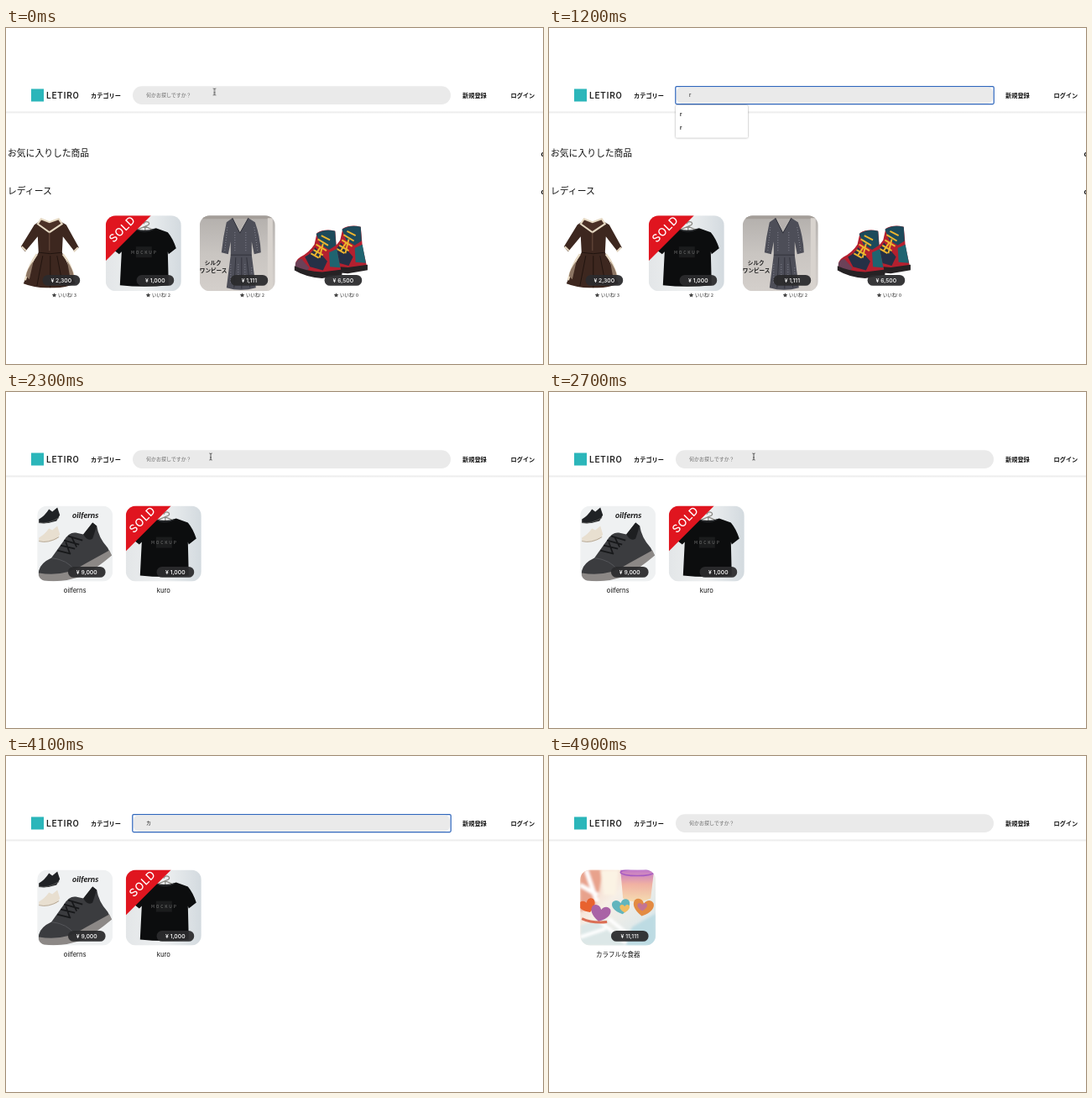
These frames come from a looping animation (640 px wide and 400 px high, 5 s). An HTML page:

```html
<!DOCTYPE html>
<html lang="ja">
<head>
<meta charset="utf-8">
<title>Flea market search</title>
<style>
html, body { margin: 0; width: 100%; height: 100%; overflow: hidden; background: #fff; }
svg { display: block; width: 640px; height: 400px; font-family: "Noto Sans CJK JP", "Noto Sans CJK", sans-serif; fill: #111; }
.nav { font-size: 7.2px; font-weight: 700; }
.head { font-size: 10.8px; font-weight: 500; }
.like { font-size: 5.3px; font-weight: 500; fill: #222; }
.price { font: 500 6.8px Inter, sans-serif; fill: #fff; text-anchor: middle; }
.name { font-size: 7.5px; font-weight: 500; text-anchor: middle; }
.latin { font: 400 7.6px Inter, sans-serif; }
.field { font-size: 6px; font-weight: 500; }
.item { font-size: 5.5px; font-weight: 700; }
.sold { font: 500 13.2px Inter, sans-serif; fill: #fff; letter-spacing: .6px; text-anchor: middle; }
.ring, .menu { fill: #fff; }
.menu { filter: drop-shadow(0 .6px .9px rgba(0, 0, 0, .4)); }

.t { animation: 5s step-end infinite; opacity: 0; }
#home { animation-name: home; }
#found { animation-name: found; }
#last { animation-name: last; }
#ring { animation-name: ring; }
#pill { animation-name: pill; }
#hint { animation-name: hint; }
#typeR, #short { animation-name: typeR; }
#typeKa { animation-name: typeKa; }
#caret { animation-name: caret; }
#list { animation-name: list; }
#beam { animation-name: beam; }
#path { animation: path 5s linear infinite; }

@keyframes home { 0% { opacity: 1 } 42%, 100% { opacity: 0 } }
@keyframes found { 0% { opacity: 0 } 42% { opacity: 1 } 96%, 100% { opacity: 0 } }
@keyframes last { 0% { opacity: 0 } 96%, 100% { opacity: 1 } }
@keyframes ring { 0% { opacity: 0 } 6% { opacity: 1 } 42% { opacity: 0 } 58% { opacity: 1 } 96%, 100% { opacity: 0 } }
@keyframes pill { 0% { opacity: 1 } 6% { opacity: 0 } 42% { opacity: 1 } 58% { opacity: 0 } 96%, 100% { opacity: 1 } }
@keyframes hint { 0% { opacity: 1 } 18% { opacity: 0 } 42% { opacity: 1 } 82% { opacity: 0 } 96%, 100% { opacity: 1 } }
@keyframes typeR { 0% { opacity: 0 } 18% { opacity: 1 } 42%, 100% { opacity: 0 } }
@keyframes typeKa { 0% { opacity: 0 } 82% { opacity: 1 } 96%, 100% { opacity: 0 } }
@keyframes caret { 0% { opacity: 0 } 6% { opacity: 1 } 12% { opacity: 0 } 58% { opacity: 1 } 64% { opacity: 0 } 70% { opacity: 1 } 76%, 100% { opacity: 0 } }
@keyframes list { 0% { opacity: 0 } 6% { opacity: 1 } 18% { opacity: 0 } 58% { opacity: 1 } 82%, 100% { opacity: 0 } }
@keyframes beam { 0% { opacity: 1 } 18% { opacity: 0 } 46% { opacity: 1 } 82%, 100% { opacity: 0 } }
@keyframes path {
  0%, 18% { transform: translate(248.5px, 76px) }
  46%, 54% { transform: translate(244px, 77px) }
  60%, 100% { transform: translate(232px, 73px) }
}
</style>
</head>
<body>
<svg viewBox="0 0 640 400">
  <defs>
    <clipPath id="round"><rect width="90" height="90" rx="12"/></clipPath>
    <filter id="soft" x="-10%" y="-10%" width="120%" height="120%"><feGaussianBlur stdDeviation=".45"/></filter>
    <filter id="haze" x="-30%" y="-30%" width="160%" height="160%"><feGaussianBlur stdDeviation="1.8"/></filter>
    <linearGradient id="wall"><stop stop-color="#e3e6e8"/><stop offset=".5" stop-color="#eef0f1"/><stop offset="1" stop-color="#d3dadf"/></linearGradient>
    <linearGradient id="cloth" x2="0" y2="1"><stop stop-color="#b3afac"/><stop offset=".5" stop-color="#c9c5c1"/><stop offset="1" stop-color="#d4cfcb"/></linearGradient>
    <linearGradient id="table" x2="1" y2="1"><stop stop-color="#f3c8b4"/><stop offset=".4" stop-color="#f7efe6"/><stop offset="1" stop-color="#cfe4ec"/></linearGradient>
    <linearGradient id="glass" x2="0" y2="1"><stop stop-color="#b55bc4"/><stop offset=".45" stop-color="#f0a291"/><stop offset="1" stop-color="#f8d9a4"/></linearGradient>
    <linearGradient id="edge" x2="0" y2="1"><stop stop-color="#e4e4e4"/><stop offset="1" stop-color="#fff"/></linearGradient>

    <g id="dress">
      <rect width="90" height="90" fill="#fff"/>
      <g filter="url(#soft)">
        <path d="M33 7 27 11 11 37 16 43 31 25 32 44Q22 60 14 81 29 87 46 86 63 87 76 81 69 60 60 44L61 25 75 43 80 38 65 11 58 7Z" fill="#3d271f"/>
        <path d="M30 46Q21 58 16 77M61 46Q71 58 75 77" stroke="#e6d9c3" stroke-width="2.4" fill="none"/>
        <path d="M26 54Q18 64 17 72L21 76ZM66 54Q73 64 74 72L70 76Z" fill="#8d7664"/>
        <path d="M12 37l5 5M79 38l-5 5" stroke="#e6d9c3" stroke-width="2"/>
        <path d="M35 4 31 10 45 20 60 10 56 4 45 8Z" fill="#4b3026" stroke="#e6d9c3" stroke-width="2"/>
        <path d="M32 44Q46 47 60 44M37 48 30 84M46 48V86M54 48 61 84" stroke="#21140f" fill="none"/>
        <path d="M45 20V42" stroke="#785848" stroke-width=".8"/>
      </g>
    </g>

    <g id="tee">
      <rect width="90" height="90" fill="url(#wall)"/>
      <g filter="url(#soft)">
        <path d="M47 18V13Q54 11 51 8 47 6 45 10M35 18 47 13 58 18" stroke="#8c8a85" stroke-width="1.3" fill="none"/>
        <path d="M34 15Q46 20 60 15L74 20Q80 27 84 39L75 46 74 43 75 83Q46 86 17 83L19 43 16 46 7 39Q12 26 21 20Z" fill="#0c0d0e"/>
        <path d="M36 16Q46 22 58 16" stroke="#33363a" fill="none"/>
        <rect x="36" y="37" width="19" height="13" fill="#1b1c1d"/>
      </g>
      <text x="46" y="45.5" font-size="5" letter-spacing="1.8" fill="#777" text-anchor="middle">MOCKUP</text>
      <path d="M0 0H54L0 54Z" fill="#e0151f"/>
      <text class="sold" transform="translate(19.6 16.2) rotate(-45)" y="4.8">SOLD</text>
    </g>

    <g id="silk">
      <rect width="90" height="90" fill="url(#cloth)"/>
      <path d="M0 0H90V4H0Z" fill="#a49e99"/>
      <path d="M84 3V90" stroke="#d8d3ce" stroke-width="6"/>
      <g filter="url(#soft)">
        <path d="M39 3 32 8Q28 25 26 44L34 46 37 31 37 47 32 86Q49 91 67 86L62 47 62 31 65 46 73 44Q72 24 66 8L58 3 48 20Z" fill="#4d4e58"/>
        <path d="M39 3 48 21 58 3M37 47H62M43 50 41 86M50 50V87M56 50 60 86" stroke="#32333c" fill="none"/>
        <path d="M33 14 30 42M42 20V44M55 20V44M65 14 69 42M37 58v24M46 58v24M54 58v24M62 62v18" stroke="#858691" stroke-dasharray="1 2"/>
        <path d="M42 4 48 17 55 4Z" fill="#b5b0ad"/>
      </g>
      <g font-size="6.6" font-weight="700" fill="#222"><text x="6" y="59">シルク</text><text x="0" y="67.5">ワンピース</text></g>
    </g>

    <g id="boot">
      <path d="M2 51Q1 43 8 39 18 34 24 25L27 12Q36 7 48 10L50 32 55 54 50 59 5 54Z" fill="#b4202f"/>
      <path d="M26 13Q36 7 48 10L49 26 41 31 31 25Z" fill="#1d4a5b"/>
      <path d="M13 39Q21 35 25 28L39 44 34 54 19 50Z" fill="#253046"/>
      <path d="M41 34 50 30 54 51 42 50Z" fill="#1f6470"/>
      <path d="M2 46Q4 42 9 41L18 51 15 56 2 52Z" fill="#6c4158"/>
      <path d="M1 49 1 54Q15 62 33 63L56 59V53L33 56Q14 55 1 49Z" fill="#262224"/>
      <path d="M20 35 29 40M23 31 34 37M26 25 38 32M28 19 40 26M32 15 42 20M30 40 34 24M24 38 31 28" stroke="#edb52f" stroke-width="1.9" fill="none"/>
    </g>
    <g id="boots">
      <rect width="90" height="90" fill="#fff"/>
      <g filter="url(#soft)">
        <use href="#boot" transform="translate(31 3) scale(1.02 1.05)"/>
        <use href="#boot" transform="translate(0 8) scale(1.03 1.06)"/>
      </g>
    </g>

    <g id="wool">
      <rect width="90" height="90" fill="#eff1f2"/>
      <g filter="url(#soft)">
        <path d="M2 16Q9 12 14 4L18 7 24 2 27 11 23 18Q11 22 2 20Z" fill="#202225"/>
        <path d="M2 20Q13 22 26 14" stroke="#555" fill="none"/>
        <path d="M2 38Q9 34 14 27L18 29 24 24 27 34 23 40Q11 45 2 42Z" fill="#e8dfd0"/>
        <path d="M2 42Q13 45 26 37" stroke="#b7aa98" fill="none"/>
        <path d="M2 77Q4 68 17 62L32 41Q38 31 46 32L55 34 66 20 71 24Q73 38 84 50L88 58 70 72Q47 89 12 88 0 87 2 77Z" fill="#3b3c3f"/>
        <path d="M2 80Q34 85 57 69L86 53 89 59Q70 75 55 83 31 92 8 89 1 87 2 80Z" fill="#8c8886"/>
        <path d="M55 34 66 20 71 24 66 39Q60 43 55 34Z" fill="#1e1f21"/>
        <path d="M24 53 40 57M28 47 45 51M32 41 50 46M37 36 54 41M39 57 34 43M47 49 41 37" stroke="#17181a" stroke-width="1.7" fill="none"/>
        <path d="M17 62Q36 64 45 77" stroke="#55565a" fill="none"/>
      </g>
      <text x="57.5" y="14.5" text-anchor="middle" font-family="Lato, sans-serif" font-size="10" font-weight="700" font-style="italic">oilferns</text>
    </g>

    <path id="heart" d="M0 8C-9 3-11-2-9-6-6-9-2-8 0-4 2-8 6-9 9-6 11-2 9 3 0 8Z"/>
    <g id="bowls">
      <rect width="90" height="90" fill="url(#table)"/>
      <g filter="url(#haze)">
        <path d="M0 0H27L20 40 0 50Z" fill="#e8a28c"/>
        <path d="M7 0 20 38M0 18 21 30" stroke="#fff" stroke-width="5"/>
        <path d="M24 0H46L42 30H28Z" fill="#fbf3e4"/>
        <path d="M0 66 28 58 52 90H0Z" fill="#dce7e7"/>
        <path d="M22 60 56 88M34 58 66 84M0 80 30 70" stroke="#fff" stroke-width="4"/>
        <path d="M62 68 90 52V90H54Z" fill="#bddbe3"/>
      </g>
      <g filter="url(#soft)">
        <path d="M48 0H88L84 34Q67 42 51 34Z" fill="url(#glass)" opacity=".8"/>
        <ellipse cx="68" cy="3" rx="20" ry="4" fill="none" stroke="#a55ac2" stroke-width="1.5"/>
        <use href="#heart" transform="translate(9 43) rotate(-20)" fill="#e8622f"/>
        <use href="#heart" transform="translate(24 52) rotate(12) scale(1.2)" fill="#a963a6"/>
        <use href="#heart" transform="translate(49 44) rotate(-10) scale(1.1)" fill="#62b5bd"/>
        <use href="#heart" transform="translate(53 46) scale(.6)" fill="#f2bd62"/>
        <use href="#heart" transform="translate(75 45) rotate(10) scale(1.25)" fill="#e38b43"/>
        <use href="#heart" transform="translate(74 44) scale(.6)" fill="#c47493"/>
        <path d="M2 58Q15 64 32 62" stroke="#db6f55" stroke-width="3" fill="none"/>
      </g>
    </g>
  </defs>

  <rect width="640" height="400" fill="#fff"/>
  <rect y="99.6" width="640" height="2.6" fill="url(#edge)"/>
  <rect x="30" y="72.5" width="15" height="15" fill="#2bb6ba"/>
  <text x="48" y="84" font-family="Roboto, sans-serif" font-size="10.5" font-weight="500" letter-spacing=".8" fill="#222">LETIRO</text>
  <g class="nav">
    <text x="101" y="82.7">カテゴリー</text>
    <text x="544" y="82.7">新規登録</text>
    <text x="601.5" y="82.7">ログイン</text>
  </g>

  <g id="home" class="t">
    <g class="head">
      <text x="2" y="153.2">お気に入りした商品</text>
      <text x="2" y="198">レディース</text>
    </g>
    <g font-size="8" font-weight="700"><text x="637.6" y="153">c</text><text x="637.6" y="197.8">c</text></g>
  </g>
  <g id="found" class="t"></g>
  <g id="last" class="t"></g>

  <g id="ring" class="t">
    <rect class="ring" x="150.8" y="69.5" width="379.4" height="21.1" rx="1.5" stroke="#2f66bb" stroke-width="1.25"/>
    <rect x="152" y="70.6" width="377" height="18.9" rx="6" fill="#eaeaea"/>
  </g>
  <rect id="pill" class="t" x="151" y="69.3" width="379" height="21.6" rx="10.8" fill="#eaeaea"/>
  <g class="field">
    <text id="hint" class="t" x="167" y="82.2" fill="#6b6b6b">何かお探しですか？</text>
    <text id="typeR" class="t" x="167" y="82.2">r</text>
    <text id="typeKa" class="t" x="167" y="82.2">カ</text>
  </g>
  <rect id="caret" class="t" x="167" y="76.5" width=".7" height="7"/>
  <g id="list" class="t"></g>
  <g id="short" class="t"></g>
  <g id="path"><path id="beam" class="t" d="M-1.6-4Q0-4 0-3 0-4 1.6-4M0-3V3M-1.6 4Q0 4 0 3 0 4 1.6 4M-.8 1H.8" fill="none" stroke="#333" stroke-width=".8"/></g>
</svg>
<script>
const add = (id, html) => document.getElementById(id).insertAdjacentHTML('beforeend', html);

const card = (x, y, art, price, drop, foot) => `<g transform="translate(${x} ${y})">
  <use href="#${art}" clip-path="url(#round)"/>
  <rect x="36.8" y="${70.8 + drop}" width="44.6" height="12.8" rx="6.4" fill="#2b2b2d" opacity=".94"/>
  <text class="price" x="59" y="${79.7 + drop}">¥ ${price}</text>${foot}</g>`;

const star = Array.from({ length: 10 }, (_, i) => {
  const r = i % 2 ? 1.4 : 2.9, a = i * Math.PI / 5;
  return [50.7 + r * Math.sin(a), 95 - r * Math.cos(a)].map(v => v.toFixed(2));
}).join(' ');

const likes = n => `<polygon points="${star}" fill="#444"/><text class="like" x="55.3" y="97">いいね! ${n}</text>`;
const label = (s, kind = '') => `<text class="name ${kind}" x="45" y="103">${s}</text>`;

[['dress', '2,300', 3], ['tee', '1,000', 2], ['silk', '1,111', 2], ['boots', '6,500', 0]]
  .forEach(([art, price, n], i) => add('home', card(6.8 + i * 112, 223.2, art, price, 0, likes(n))));

add('found', card(37.2, 135.6, 'wool', '9,000', 1.6, label('oilferns', 'latin')));
add('found', card(142.8, 135.6, 'tee', '1,000', 1.6, label('kuro', 'latin')));
add('last', card(37.2, 135.6, 'bowls', '11,111', 1.6, label('カラフルな食器')));

const menu = (id, words) => add(id,
  `<rect class="menu" x="151" y="92" width="86" height="${words.length * 16.1 + 6.6}" rx="1.5"/>` +
  words.map((w, i) => `<text class="item" x="156" y="${105.2 + i * 16.1}">${w}</text>`).join(''));

menu('list', ['a', '醤油', 'シャツ', 'b', 'r', 'セ']);
menu('short', ['r', 'r']);
</script>
</body>
</html>
```
